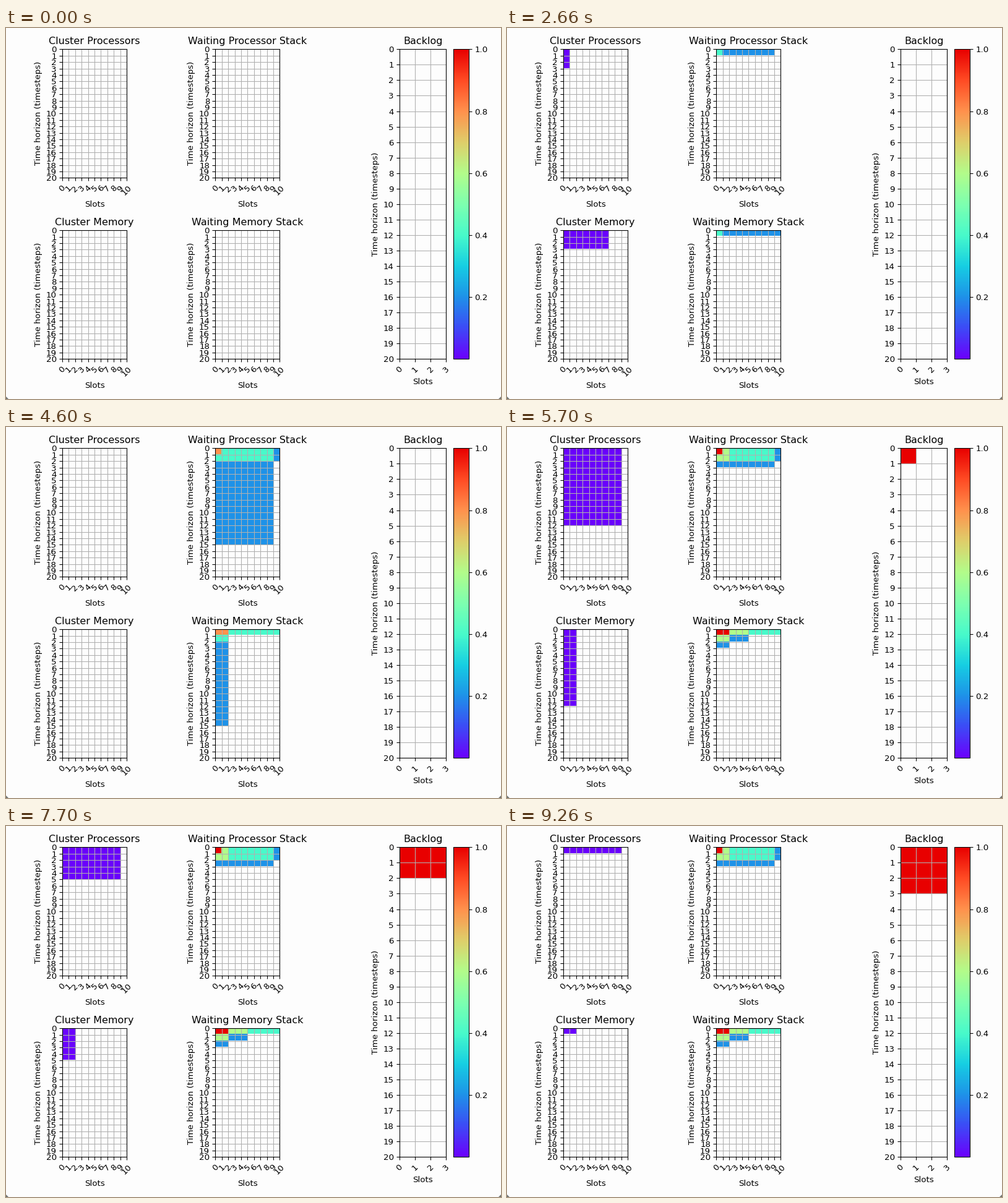
Recreate the animation shown at these times as a matplotlib script. Size 800 px wide and 600 px high, loop 9290 ms.

```python
import numpy as np
import matplotlib.pyplot as plt
from matplotlib.animation import FuncAnimation
from matplotlib.cm import ScalarMappable
from matplotlib.colors import LinearSegmentedColormap, Normalize
from matplotlib.patches import Polygon

W, H = 800, 600
LOOP, STEPS = 9290, 29
ROWS, SLOTS, BACKLOG_SLOTS = 20, 10, 3
RUNNING, BLUE, GREEN, YELLOW, ORANGE, RED = 0.001, 0.2, 0.4, 0.6, 0.8, 1.0
PAPER = "#fdfdfd"

S = 0.96  # default matplotlib sizes at 96 dpi, on a 100 dpi figure
plt.rcParams.update({
    "font.family": "DejaVu Sans", "font.size": 10 * S,
    "axes.titlesize": 12 * S, "axes.titlepad": 6 * S, "axes.labelpad": 4.4 * S,
    "axes.linewidth": 0.8 * S, "grid.linewidth": 0.8 * S,
    "grid.color": "#b0b0b0", "axes.facecolor": PAPER,
    "xtick.major.size": 3.5 * S, "ytick.major.size": 3.5 * S,
    "xtick.major.width": 0.8 * S, "ytick.major.width": 0.8 * S,
    "xtick.major.pad": 4 * S, "ytick.major.pad": 3.5 * S,
})

stops = [(106, 0, 252), (60, 75, 246), (30, 146, 232), (22, 206, 226),
         (72, 250, 202), (125, 255, 175), (178, 252, 138), (222, 206, 106),
         (255, 145, 77), (255, 75, 36), (232, 0, 0)]
cmap = LinearSegmentedColormap.from_list("jobs", np.array(stops) / 255)
cmap.set_bad((0, 0, 0, 0))
norm = Normalize(0, 1)

fig = plt.figure(figsize=(W / 100, H / 100), dpi=100, facecolor=PAPER)


def box(left, top, right, bottom):
    return fig.add_axes([left / W, 1 - bottom / H,
                         (right - left) / W, (bottom - top) / H])


def panel(title, edges, slots):
    ax = box(*edges)
    img = ax.imshow(np.ma.masked_all((ROWS, slots)), cmap=cmap, norm=norm,
                    extent=(0, slots, ROWS, 0), aspect="auto",
                    interpolation="nearest")
    ax.set_title(title)
    ax.set_xlabel("Slots")
    ax.set_ylabel("Time horizon (timesteps)")
    ax.set_xticks(range(slots + 1))
    ax.set_yticks(range(ROWS + 1))
    ax.tick_params(axis="x", rotation=45)
    ax.grid(True)
    return img


CELL = 10.4
TOP, LOW, BASE = 34.35, 327.2, 535.2
LEFT, MIDDLE = 91, 338.35


def stack_panel(title, x, y):
    return panel(title, (x, y, x + SLOTS * CELL, y + ROWS * CELL), SLOTS)


cpu = stack_panel("Cluster Processors", LEFT, TOP)
mem = stack_panel("Cluster Memory", LEFT, LOW)
wait_cpu = stack_panel("Waiting Processor Stack", MIDDLE, TOP)
wait_mem = stack_panel("Waiting Memory Stack", MIDDLE, LOW)
backlog = panel("Backlog", (636.1, TOP, 711.3, BASE), BACKLOG_SLOTS)
fig.colorbar(ScalarMappable(norm, cmap), cax=box(723.2, TOP, 748.2, BASE),
             ticks=[0.2, 0.4, 0.6, 0.8, 1.0])

# Dark remains of the rounded window corners
for x, dx in ((0, 4), (W, -4)):
    fig.add_artist(Polygon([(x / W, 0), ((x + dx) / W, 0), (x / W, 4 / H)],
                           color="#6f7370", lw=0))


def stack(jobs):
    """Paint (width, height, value) jobs over each other from the corner."""
    grid = np.zeros((ROWS, SLOTS))
    for width, height, value in jobs:
        grid[:height, :width] = value
    return np.ma.masked_equal(grid, 0)


def running(step):
    """Processors, memory and remaining time of the job on the cluster."""
    if 4 <= step <= 10:
        return 1, 7, 11 - step
    if step >= 15:
        return 9, 2, 29 - step
    return 0, 0, 0


def waiting(step):
    """Job layers of the processor stack and of the memory stack."""
    if step < 2 or 4 <= step < 6:
        return [], []
    if step < 4:
        return [(1, 8, BLUE)], [(7, 8, BLUE)]
    if step < 11:
        p, m = [(9, 1, BLUE)], [(10, 1, BLUE)]
        if step >= 8:
            p.append((1, 1, GREEN))
            m.append((1, 1, GREEN))
        return p, m
    if step < 15:
        p = [(10, 2, BLUE), (9, 15, BLUE), (9, 2, GREEN)]
        m = [(2, 15, BLUE), (2, 2, GREEN), (10, 1, GREEN)]
        if step >= 13:
            p.append((1, 1, ORANGE))
            m.append((2, 1, ORANGE))
        return p, m
    p = [(10, 2, BLUE), (9, 3, BLUE), (9, 2, GREEN), (2, 2, YELLOW)]
    m = [(5, 2, BLUE), (2, 3, BLUE), (10, 1, GREEN),
         (5, 1, YELLOW), (2, 2, YELLOW)]
    last = RED if step >= 16 else ORANGE
    return p + [(1, 1, last)], m + [(2, 1, last)]


def queued(step):
    count = 1 + round((step - 17) * 8 / 11) if step >= 17 else 0
    grid = np.zeros(ROWS * BACKLOG_SLOTS)
    grid[:count] = RED
    return np.ma.masked_equal(grid.reshape(ROWS, BACKLOG_SLOTS), 0)


def draw(step):
    procs, memory, left = running(step)
    p, m = waiting(step)
    cpu.set_data(stack([(procs, left, RUNNING)]))
    mem.set_data(stack([(memory, left, RUNNING)]))
    wait_cpu.set_data(stack(p))
    wait_mem.set_data(stack(m))
    backlog.set_data(queued(step))
    return cpu, mem, wait_cpu, wait_mem, backlog


anim = FuncAnimation(fig, draw, frames=STEPS, init_func=lambda: draw(0),
                     interval=LOOP / STEPS, repeat=True, repeat_delay=0)
plt.show()
```
